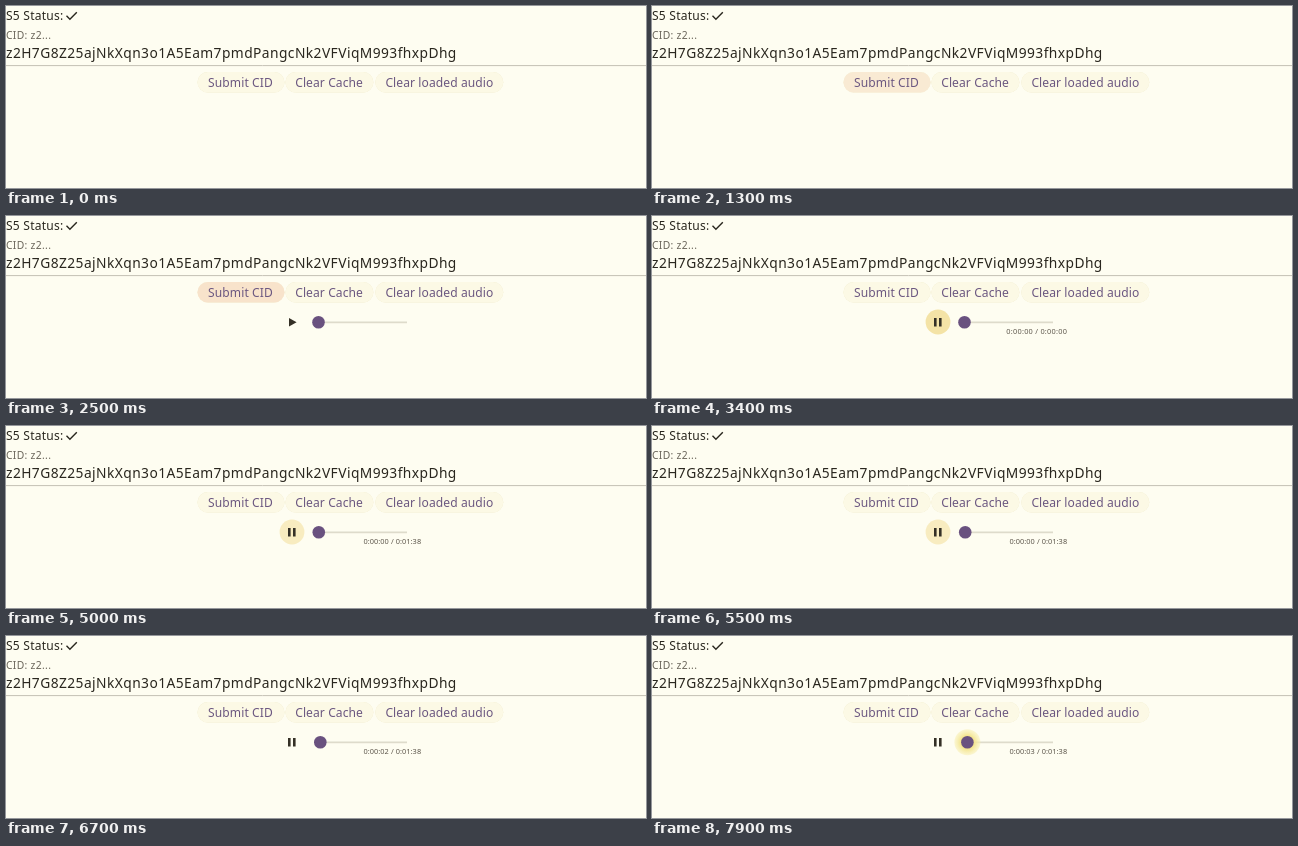
Write an HTML page that moves like this. It is 640 px wide and 182 px high and loops after 8 s.

```html
<!DOCTYPE html>
<html lang="en">
<meta charset="utf-8">
<title>Audio player</title>
<style>
  html, body { margin: 0; height: 100%; overflow: hidden; background: #fefdf1; }
  svg { display: block; width: 100vw; height: 100vh; font-family: "Noto Sans", sans-serif; }
  .status { font-size: 12.07px; letter-spacing: .215px; fill: #29261e; }
  .label { font-size: 10.34px; letter-spacing: .32px; fill: #6b665b; }
  .value { font-size: 13.79px; letter-spacing: .431px; fill: #29261e; }
  .button text { font-size: 12.07px; letter-spacing: .086px; fill: #6b5780; }
  .button rect { fill: #fcf9e5; filter: drop-shadow(0 .8px .7px #d9d09780); }
  #time { font-size: 7.4px; letter-spacing: .06px; fill: #5d574c; }
  #time.empty { letter-spacing: .24px; }
</style>
<svg viewBox="0 0 640 182">
  <defs>
    <clipPath id="pill"><rect x="191.5" y="66" width="87" height="20.6" rx="10.3"/></clipPath>
    <radialGradient id="glow">
      <stop offset=".5" stop-color="#f3e48e"/>
      <stop offset="1" stop-color="#f8efb0" stop-opacity=".5"/>
    </radialGradient>
  </defs>
  <text class="status" y="13.8">S5 Status:</text>
  <path d="M60.5 9.8 63.9 13.2 70.8 6.2" fill="none" stroke="#29261e" stroke-width="1.4"/>
  <text class="label" y="33">CID: z2...</text>
  <text class="value" y="52">z2H7G8Z25ajNkXqn3o1A5Eam7pmdPangcNk2VFViqM993fhxpDhg</text>
  <path d="M0 59.6H640" stroke="#c4c1b4"/>
  <g class="button">
    <rect x="191.5" y="66" width="87" height="20.6" rx="10.3"/>
    <g clip-path="url(#pill)">
      <rect id="hover" x="191" y="65" width="88" height="23" style="fill:#f8e3cb;filter:none"/>
      <circle id="ripple" cx="235" cy="76" fill="#e9c9bd"/>
    </g>
    <text x="202.1" y="80.8">Submit CID</text>
  </g>
  <g class="button">
    <rect x="279.4" y="66" width="88" height="20.6" rx="10.3"/>
    <text x="289.2" y="80.8">Clear Cache</text>
  </g>
  <g class="button">
    <rect x="369.3" y="66" width="128" height="20.6" rx="10.3"/>
    <text x="379.4" y="80.8">Clear loaded audio</text>
  </g>
  <g id="player">
    <circle id="halo" cx="286" cy="106" r="12.4" fill="#f4e3a6"/>
    <path id="icon" fill="#343026"/>
    <path d="M312 106.4H401" stroke="#dedbcb" stroke-width="1.6"/>
    <circle id="glowDisc" cy="106.3" r="13" fill="url(#glow)"/>
    <circle id="thumb" cy="106.3" r="6.3" fill="#69517f"/>
    <text id="time" x="415.2" y="118.4" text-anchor="end"></text>
  </g>
</svg>
<script>
  const LOOP = 8000, PLAY_START = 4700, DURATION = 98;
  const PLAY = 'M283 102V110.4L290.6 106.2Z';
  const PAUSE = 'M282 102h2.6v8.4h-2.6zM287 102h2.6v8.4h-2.6z';
  const $ = id => document.getElementById(id);
  const ramp = (t, from, to) => Math.min(1, Math.max(0, (t - from) / (to - from)));
  const set = (id, attrs) => {
    for (const name in attrs) $(id).setAttribute(name, attrs[name]);
  };
  const clock = s => '0:' + [s / 60, s % 60].map(n => String(Math.floor(n)).padStart(2, '0')).join(':');

  function draw(t) {
    const seconds = Math.max(0, t - PLAY_START) / 1000;
    const loaded = t >= 5000;
    const x = 312.5 + (loaded ? seconds * 88.5 / DURATION : 0);

    set('hover', { opacity: ramp(t, 1200, 1350) - ramp(t, 3000, 3150) });
    set('ripple', {
      r: 46 * ramp(t, 2050, 2300),
      opacity: .6 * (ramp(t, 2050, 2150) - ramp(t, 2250, 2480))
    });

    set('player', { visibility: t >= 2300 ? 'visible' : 'hidden' });
    const pressed = ramp(t, 3250, 3400) - ramp(t, 3600, 3800);
    const hovered = ramp(t, 3050, 3200) - ramp(t, 5850, 6000);
    set('halo', { opacity: .65 * hovered + .35 * pressed });
    set('icon', { d: t >= 3300 ? PAUSE : PLAY });
    set('glowDisc', { cx: x, opacity: ramp(t, 7600, 7850) });
    set('thumb', { cx: x });
    set('time', { class: loaded ? '' : 'empty' });
    $('time').textContent = t < 3300 ? ''
      : `${clock(loaded ? seconds : 0)} / ${clock(loaded ? DURATION : 0)}`;
  }

  const start = performance.now();
  (function tick() {
    draw((performance.now() - start) % LOOP);
    requestAnimationFrame(tick);
  })();
</script>
</html>
```
